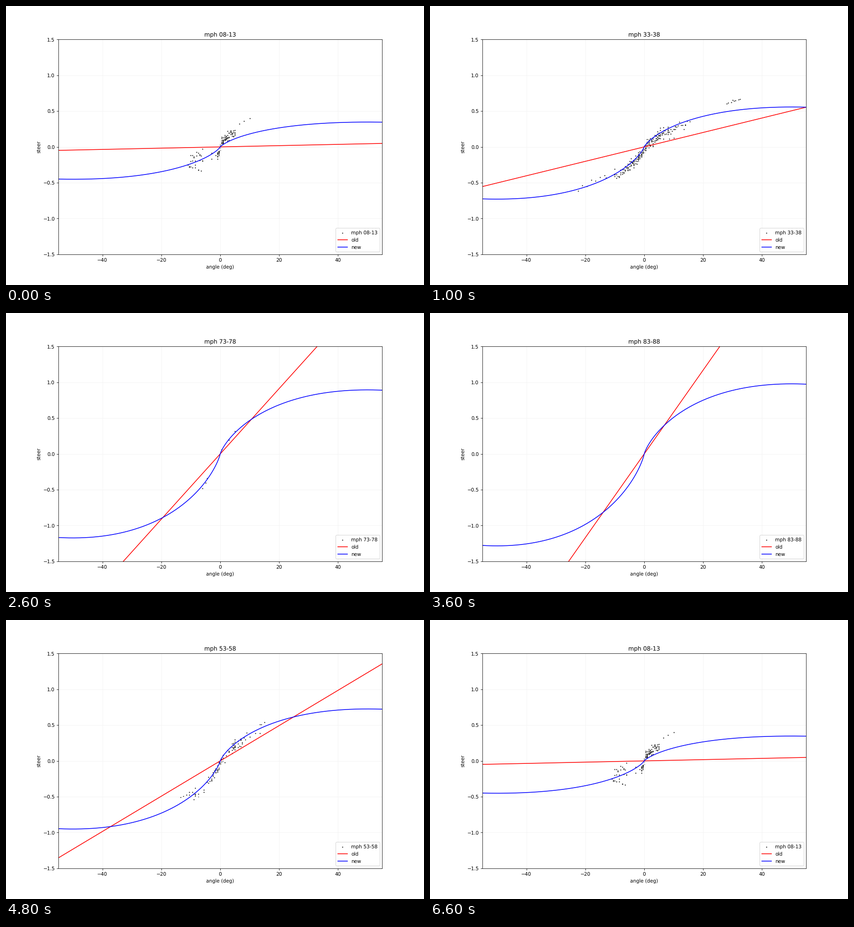
A matplotlib script that plays this animation: 917x611 px, repeating every 6800 ms.

```python
import numpy as np
import matplotlib.pyplot as plt
from matplotlib.animation import FuncAnimation

W, H = 917, 611
DPI = W / 12
STEPS = 17            # speed bins, played forward and then back
FRAME_MS = 200
PEAK = 50             # angle where the new curve levels off

# extra streaks of samples: bin -> (count, start, end, jitter)
STREAKS = {
    0: [(35, (.8, .1), (5.2, .2), .035),
        (27, (-10.8, -.23), (-5.8, -.19), .075),
        (3, (6.5, .32), (10, .41), .01)],
    5: [(8, (28, .61), (32.5, .66), .015),
        (6, (-22.5, -.58), (-15, -.42), .03),
        (12, (8, .23), (14, .29), .06)],
    9: [(3, (13.5, .5), (15, .53), .01),
        (6, (-13.5, -.52), (-8.5, -.4), .015)],
}


def low_mph(step):
    return 8 + 5 * step


def mid_mph(step):
    return low_mph(step) + 2.5


def old_steer(angle, mph):
    return 8e-6 * mph ** 2 * angle


def new_steer(angle, mph):
    u = np.maximum(np.abs(angle), 1e-9) / PEAK
    gain = np.where(angle < 0, -.0111 * (mph + 30.2), .00842 * (mph + 30.67))
    return gain * u * (1 - np.log(u))


def samples(step):
    """Seeded cloud along the new curve, plus the streaks of this bin."""
    rng = np.random.default_rng(40 + step)
    low_speed = np.exp(-step)
    count = max(0, int(192 * np.exp(-((step - 5) / 4.5) ** 2) - 2))
    x = rng.normal(.6 * low_speed, 5.5 - 4 * low_speed, count)
    x = np.round(x * 2) / 2
    y = new_steer(x, mid_mph(step)) + .06 * low_speed * np.sign(x)
    y += -.03 * (1 - low_speed) + rng.normal(0, .028 + .002 * np.abs(x))
    parts = [np.column_stack([x, y])]
    for n, start, end, jitter in STREAKS.get(step, []):
        line = np.linspace(start, end, n)
        line[:, 0] = np.round(line[:, 0] * 2) / 2
        line[:, 1] += rng.normal(0, jitter, n)
        parts.append(line)
    return np.vstack(parts)


clouds = [samples(k) for k in range(STEPS)]
angles = np.linspace(-55, 55, 551)

plt.rcParams["text.hinting"] = "none"
# the tiny margin keeps the pixel size from being truncated
fig, ax = plt.subplots(figsize=((W + 1e-6) / DPI, (H + 1e-6) / DPI), dpi=DPI)
dots = ax.scatter([], [], s=1, color="black", label="mph 08-13")
old_line, = ax.plot([], [], color="red", label="old")
new_line, = ax.plot([], [], color="blue", label="new")
ax.set_xlim(-55, 55)
ax.set_ylim(-1.5, 1.5)
ax.set_xlabel("angle (deg)")
ax.set_ylabel("steer")
ax.grid(color="#f2f2f2")
title = ax.set_title("mph 08-13")
legend = ax.legend(loc="lower right", labelspacing=.52, borderpad=.43)
legend_text = legend.get_texts()[0]


def update(i):
    step = min(i, 2 * STEPS - 1 - i)
    mph = mid_mph(step)
    name = f"mph {low_mph(step):02d}-{low_mph(step + 1):02d}"
    title.set_text(name)
    legend_text.set_text(name)
    dots.set_offsets(clouds[step])
    old_line.set_data(angles, old_steer(angles, mph))
    new_line.set_data(angles, new_steer(angles, mph))
    return dots, old_line, new_line, title, legend_text


anim = FuncAnimation(fig, update, frames=2 * STEPS, interval=FRAME_MS,
                     repeat=True, repeat_delay=0, blit=False)
plt.show()
```
